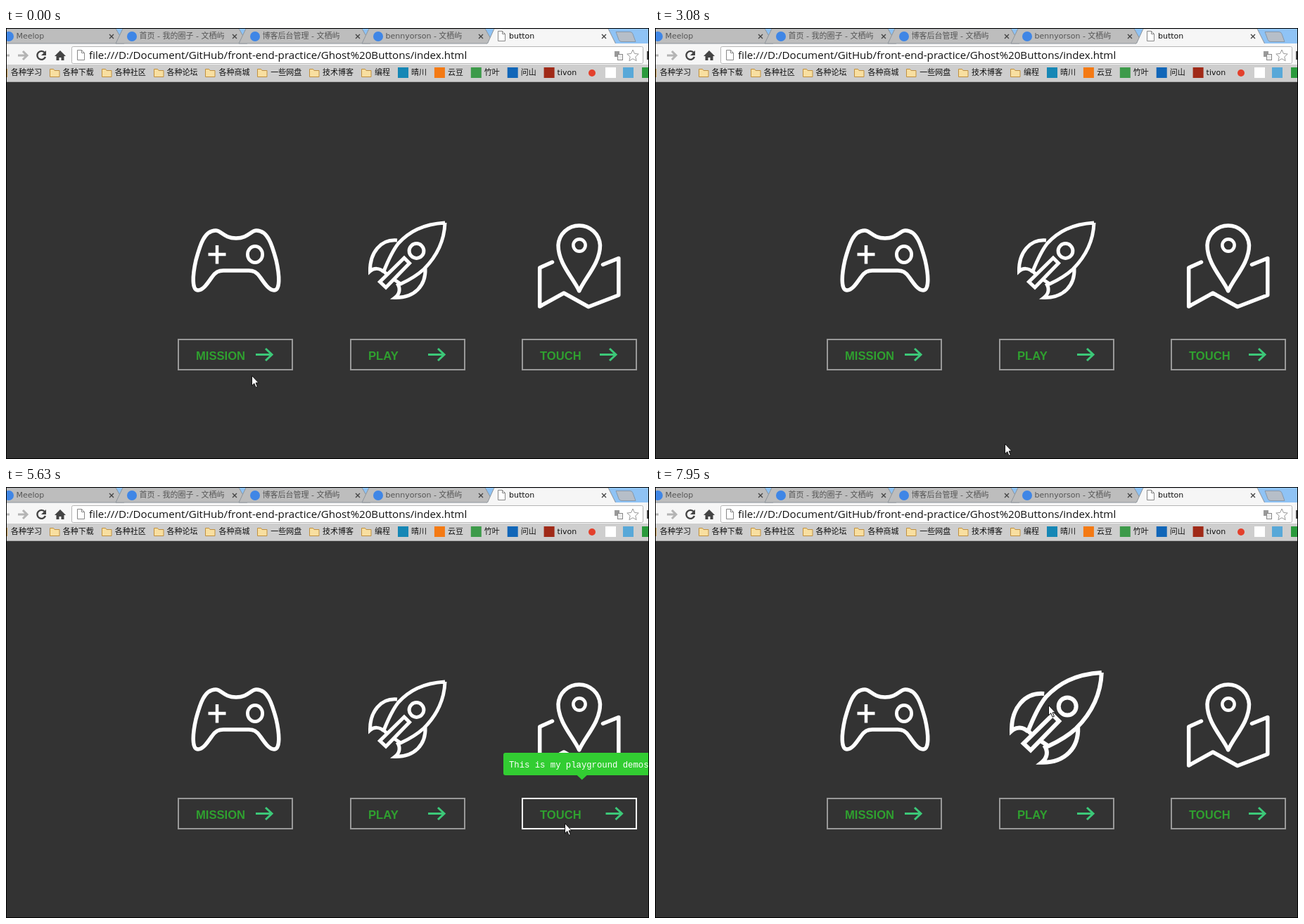
An HTML page for the animation above (8 s loop, 914 px wide and 613 px high).

```html
<!DOCTYPE html>
<html lang="zh">
<head>
<meta charset="utf-8">
<title>button</title>
<style>
html, body { margin: 0; width: 100%; height: 100%; overflow: hidden; background: #333; }
svg { display: block; }
text { white-space: pre; }
.ui { font: 11px "DejaVu Sans", "Noto Sans CJK SC", "Noto Sans CJK", sans-serif; }
.url { font: 15.12px "Open Sans", "Noto Sans", sans-serif; }
.label { font: bold 16.6px "Liberation Sans", Arial, sans-serif; fill: #2fa02f; }
.tip { font: 12.25px "Liberation Mono", monospace; fill: #fff; }
.icon { fill: none; stroke: #fff; stroke-width: 5.5; stroke-linejoin: round; }
</style>
</head>
<body>
<svg width="914" height="613" viewBox="0 0 914 613">
  <rect width="914" height="613" fill="#333"/>
  <g id="chrome" class="ui"></g>
  <g class="icon">
    <path d="M298 288C306 288 310 299 327 299C344 299 348 288 356 288C372 288 378 308 384 330C389 352 390 373 381 373C374 373 368 364 361 354C356 347 352 345 345 345H309C302 345 298 347 293 354C286 364 280 373 273 373C264 373 265 352 270 330C276 308 282 288 298 288Z"/>
    <path d="M287.5 322H312.5M300 309V335.5" stroke-width="4.5"/>
    <ellipse cx="354" cy="322" rx="10.6" ry="11.6" stroke-width="4.8"/>
    <g id="rocket" stroke-width="5" stroke-linejoin="miter">
      <path d="M624 277C592 279 573 290 558 306C549 317 543 331 537 346L543 352M624 277C623 305 611 326 594 343C583 353 572 359 561 364L552 358"/>
      <path d="M556 302C533 300 517 319 517.5 346C523 341 531 341 537 347"/>
      <path d="M596 342C597 366 581 384 553 383.5C560 378 561 370 556 363"/>
      <path d="M566 327L573.5 334.5L540 369L531.5 361Z"/>
      <circle cx="583.5" cy="317" r="10.4"/>
    </g>
    <path d="M814.8 374C806 355 785 335 785 309A29.8 29.8 0 0 1 844.5 309C844.5 335 823 355 814.8 374Z"/>
    <circle cx="815" cy="309" r="8.6" stroke-width="4.6"/>
    <path d="M776.5 333L758.7 341V396L793 377L828 396.5L870.8 380V327.5L848.5 336.5" stroke-linecap="round"/>
  </g>
  <g id="buttons"></g>
  <g id="tips"></g>
  <path id="cursor" d="M.5 .5V14.8L3.8 11.6L6.1 17.2L8.4 16.2L6.1 10.8H10.2Z" fill="#fff" stroke="#111"/>
  <rect x=".5" y=".5" width="913" height="612" fill="none" stroke="#000"/>
</svg>
<script>
const $ = id => document.getElementById(id);
const rect = (x, y, w, h, fill, more = '') =>
  `<rect x="${x}" y="${y}" width="${w}" height="${h}" fill="${fill}" ${more}/>`;
const path = (d, fill, stroke = 'none', more = '') =>
  `<path d="${d}" fill="${fill}" stroke="${stroke}" ${more}/>`;
const circle = (x, y, r, fill) => `<circle cx="${x}" cy="${y}" r="${r}" fill="${fill}"/>`;
const text = (x, y, s, fill = '#111', cls = 'ui') =>
  `<text x="${x}" y="${y}" class="${cls}" fill="${fill}">${s}</text>`;

function drawChrome() {
  const close = x => path(`M${x - 3} 9l6 6m0-6l-6 6`, 'none', '#444', 'stroke-width="1.4"');
  const page = (x, y) => path(`M${x} ${y}h6l4 4v10h-10zM${x + 6} ${y}v4h4`, '#fff', '#888');
  const folder = x => path(`M${x} 69.5v-11h5l1.5 2h7v9z`, '#f8dfa0', '#c09040');
  const square = (x, fill) => rect(x, 56, 15, 15, fill);

  let s = rect(0, 0, 914, 23, '#8fc3f5') + rect(0, 22, 914, 30, '#f6f6f6') + rect(0, 52, 914, 25, '#cecece');

  // tabs
  ['Meelop', '首页 - 我的圈子 - 文栖屿', '博客后台管理 - 文栖屿', 'bennyorson - 文栖屿'].forEach((name, i) => {
    const x = 175 * i - 13;
    s += path(`M${x - 6} 22L${x + 4} 1H${x + 169}L${x + 181} 22Z`, '#bdbdbd', '#8d949b');
    s += circle(x + 17, 12, 7, '#3f86e6') + text(x + 27.5, 15, name, '#555') + close(x + 163);
  });
  s += path('M684 23L694 1H856L867 23Z', '#f6f6f6', '#8d949b') + rect(684, 22, 184, 3, '#f6f6f6');
  s += page(699.5, 4.5) + text(715, 15, 'button') + close(850);
  s += path('M867 5.5h20q3 0 4 3l4 11h-20q-3 0-4-3z', '#b6bec8', '#8497ab');

  // toolbar
  s += rect(93.5, 26.5, 812, 24, '#fff', 'rx="2" stroke="#b5b5b5"');
  s += path('M0 39h5M17 39h13M24 33l6 6l-6 6', 'none', '#b4b4b4', 'stroke-width="3"');
  s += path('M55 35a6 6 0 1 0 1 6', 'none', '#444', 'stroke-width="2.4"') + path('M57 32v7h-7z', '#444');
  s += path('M69 40l8-8l8 8h-2.5v6h-4v-4h-3v4h-4v-6z', '#444');
  s += page(101.5, 31.5);
  s += text(118, 44, 'file:///D:/Document/GitHub/front-end-practice/Ghost%20Buttons/index.html', '#111', 'url');
  s += rect(865, 33, 7, 8, '#999') + rect(869.5, 37.5, 7, 8, '#eee', 'stroke="#888"');
  s += path('M891 31l2.4 5.4l5.8.6l-4.4 3.9l1.3 5.8l-5.1-3l-5.1 3l1.3-5.8l-4.4-3.9l5.8-.6z', '#fff', '#999');
  s += rect(911, 33, 2, 12, '#444');

  // bookmarks
  s += rect(0, 58, 2, 12, '#c09040');
  ['各种学习', '各种下载', '各种社区', '各种论坛', '各种商城', '一些网盘', '技术博客', '编程'].forEach((name, i) => {
    const x = 7 + i * 73.85;
    s += (i ? folder(Math.round(x - 19) + .5) : '') + text(x, 67, name);
  });
  [['晴川', '#1687b5'], ['云豆', '#f47a14'], ['竹叶', '#3d9a4a'], ['问山', '#1166b8'], ['tivon', '#a02a18']]
    .forEach(([name, fill], i) => s += square(557 + i * 51.9, fill) + text(576 + i * 51.9, 67, name));
  s += circle(833, 64, 5, '#e3402c') + square(852, '#fff') + square(877, '#58a8d8') + square(904, '#2a9a3c');
  s += rect(0, 76, 914, 1, '#aaa');
  $('chrome').innerHTML = s;
}

const W = 164, H = 45, TOP = 442;
const buttons = [
  {label: 'MISSION', on: 1215, off: 2500, tipX: 240.5, tip: 'My mission is clear'},
  {label: 'PLAY', on: 3406, off: 4700, tipX: 485, tip: 'This is my playground'},
  {label: 'TOUCH', on: 5180, off: 6400, tipX: 707, tip: 'This is my playground demos'},
];

function drawButtons() {
  buttons.forEach((b, i) => {
    b.x = Math.round(244.3 + 244.4 * i);
    const tipW = b.tip.length * 7.35 + 17, mid = b.tipX + tipW / 2 + 4;
    $('buttons').innerHTML += `<g>${rect(b.x + 1, TOP + 1, W - 2, H - 2, 'none', 'stroke="#999" stroke-width="2"')}
      ${text(b.x + 26, 472, b.label, '', 'label')}
      ${path(`M${b.x + 111} 464.5h23m-9-8.5l9 8.5l-9 8.5`, 'none', '#3cc878', 'stroke-width="3" class="arrow"')}
      ${'<rect class="line" fill="#fff"/>'.repeat(4)}</g>`;
    $('tips').innerHTML += `<g>${rect(b.tipX, 378, tipW, 32, '#32cd32', 'rx="3"')}
      ${path(`M${mid - 7.5} 409.5h15l-7.5 7z`, '#32cd32')}${text(b.tipX + 8, 398.5, b.tip, '', 'tip')}</g>`;
  });
  buttons.forEach((b, i) => {
    const g = $('buttons').children[i];
    b.arrow = g.querySelector('.arrow');
    b.lines = g.querySelectorAll('.line');
    b.bubble = $('tips').children[i];
  });
}

const clamp = v => Math.min(1, Math.max(0, v));
const mix = (a, b, k) => a + (b - a) * k;
const swing = k => .5 - .5 * Math.cos(Math.PI * clamp(k));

// CSS "ease": cubic-bezier(.25, .1, .25, 1)
function ease(x) {
  if (x <= 0 || x >= 1) return clamp(x);
  const bez = (a, b, s) => 3 * (1 - s) ** 2 * s * a + 3 * (1 - s) * s * s * b + s ** 3;
  let lo = 0, hi = 1;
  for (let i = 0; i < 20; i++) {
    const m = (lo + hi) / 2;
    if (bez(.25, .25, m) < x) lo = m; else hi = m;
  }
  return bez(.1, 1, lo);
}

// The screen refreshes at a slow, even rate
const STEP = 1180 / 7, PHASE = 35;
const held = t => Math.max(0, PHASE + STEP * Math.floor((t - PHASE) / STEP));

// Cursor stops: time, x, y
const stops = [
  [0, 349, 494], [500, 358, 546], [1400, 336, 468], [2390, 480, 620], [2800, 480, 620], [3743, 573, 465],
  [4755, 803, 599], [5400, 808, 468], [6272, 691, 554], [7110, 557, 309], [8000, 559, 310],
];
function cursorAt(t) {
  const i = Math.max(1, stops.findIndex(s => s[0] >= t));
  const [t0, x0, y0] = stops[i - 1], [t1, x1, y1] = stops[i], k = swing((t - t0) / (t1 - t0));
  return [mix(x0, x1, k), mix(y0, y1, k)].map(Math.round);
}

function setBox(el, x, y, width, height) {
  Object.entries({x, y, width, height}).forEach(([k, v]) => el.setAttribute(k, v));
}

function render(t) {
  for (const b of buttons) {
    const age = t < b.off ? t - b.on : 0;
    const p = ease(age / 400), q = swing(age / 300);
    const dx = 174 * (1 - p), dy = 44 * (1 - p), w = W * p, h = H * p;
    setBox(b.lines[0], b.x - dx, TOP, w, 2);
    setBox(b.lines[1], b.x + W + dx - w, TOP + H - 2, w, 2);
    setBox(b.lines[2], b.x, TOP + H + dy - h, 2, h);
    setBox(b.lines[3], b.x + W - 2, TOP - dy, 2, h);
    b.lines.forEach(l => l.setAttribute('opacity', p));
    b.arrow.setAttribute('transform', `translate(${8.5 * p})`);
    b.bubble.setAttribute('opacity', q);
    b.bubble.setAttribute('transform', `translate(0 ${-60 * (1 - q)})`);
  }
  const spin = ease((t - 6946) / 400);
  $('rocket').setAttribute('transform',
    `translate(570 342) rotate(${360 * spin}) scale(${1 + .2 * spin}) translate(-570 -342)`);
  $('cursor').setAttribute('transform', `translate(${cursorAt(t)})`);
}

drawChrome();
drawButtons();
const begin = performance.now();
(function tick() {
  render(held((performance.now() - begin) % 8000));
  requestAnimationFrame(tick);
})();
</script>
</body>
</html>
```
